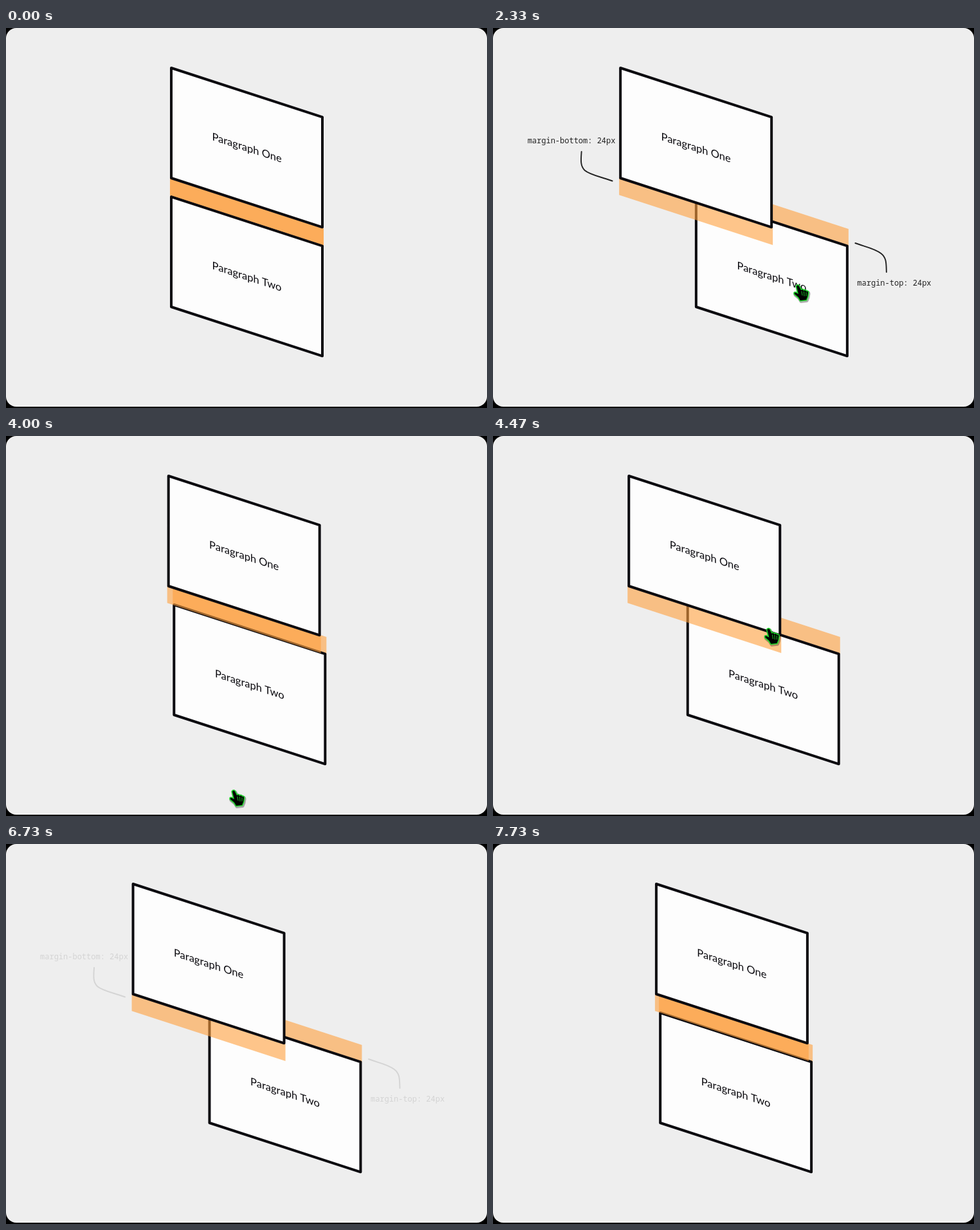
Animation, 748 px wide and 590 px high, one loop 7790 ms. Source, as an HTML page with a canvas:

```html
<!DOCTYPE html>
<html lang="en">
<head>
<meta charset="utf-8">
<title>Collapsing margins</title>
<style>
  html, body { margin: 0; width: 100%; height: 100%; overflow: hidden; background: #000; }
  canvas { display: block; width: 748px; height: 590px; }
</style>
</head>
<body>
<canvas id="stage" width="748" height="590"></canvas>
<script>
const ctx = document.getElementById('stage').getContext('2d');

const LOOP = 7790;
const STEP = 1000 / 15;
const SKEW = Math.tan(18 * Math.PI / 180);
const INK = '#0b0a0f';
const LABEL_INK = '#222';

// Overdamped spring: slow and fast decay rates per second
const SLOW = 3, FAST = 40;
const SPREAD = 60;
const targets = [[0.984, SPREAD], [3.0, 0], [3.98, SPREAD], [6.72, 0]];

// Labels: seconds at which each fade in and fade out begins
const labelFades = [[1.735, 2.875], [4.73, 6.595]];

// Pointer visits: [seconds, x, y]
const visits = [
  [[0.98, 440, 566], [1.13, 452, 485], [1.53, 474, 401], [2.65, 474, 401], [2.9, 462, 600]],
  [[3.96, 349, 575], [4.0, 354, 552], [4.13, 372, 480], [4.5, 434, 283], [6.5, 434, 283], [6.63, 430, 600]]
];

const clamp = v => Math.max(0, Math.min(1, v));

function springStep(x, v, goal, dt) {
  const y = x - goal;
  const b = -(v + SLOW * y) / (FAST - SLOW);
  const a = y - b;
  const es = a * Math.exp(-SLOW * dt), ef = b * Math.exp(-FAST * dt);
  return [goal + es + ef, -SLOW * es - FAST * ef];
}

function spreadAt(t) {
  let x = 0, v = 0;
  targets.forEach(([start, goal], i) => {
    if (t <= start) return;
    const end = i + 1 < targets.length ? targets[i + 1][0] : Infinity;
    [x, v] = springStep(x, v, goal, Math.min(t, end) - start);
  });
  return x;
}

function labelAlpha(t) {
  let alpha = 0;
  for (const [show, hide] of labelFades) {
    if (t < show) continue;
    alpha = t < hide ? clamp((t - show) / 0.25) : Math.exp(-15 * (t - hide));
  }
  return alpha;
}

function pointerAt(t) {
  for (const keys of visits) {
    for (let i = 1; i < keys.length; i++) {
      const [t0, x0, y0] = keys[i - 1], [t1, x1, y1] = keys[i];
      if (t >= t0 && t < t1) {
        const p = (t - t0) / (t1 - t0);
        return [x0 + (x1 - x0) * p, y0 + (y1 - y0) * p];
      }
    }
  }
  return null;
}

// Runs draw() in skewed space with its origin at (x, y)
function skewed(x, y, draw) {
  ctx.save();
  ctx.transform(1, SKEW, 0, 1, x, y);
  draw();
  ctx.restore();
}

function margin(x, top, bottom) {
  skewed(x - 2, 0, () => {
    ctx.fillStyle = 'rgba(255,161,63,0.6)';
    ctx.fillRect(0, top, 239, bottom - top);
  });
}

function paragraph(x, y, text) {
  const w = 235, h = 171;
  ctx.beginPath();
  ctx.moveTo(x, y);
  ctx.lineTo(x + w, y + w * SKEW);
  ctx.lineTo(x + w, y + w * SKEW + h);
  ctx.lineTo(x, y + h);
  ctx.closePath();
  ctx.fillStyle = '#fdfdfd';
  ctx.fill();
  ctx.lineWidth = 4;
  ctx.lineJoin = 'round';
  ctx.strokeStyle = INK;
  ctx.stroke();
  skewed(x, y, () => {
    ctx.fillStyle = INK;
    ctx.font = '16.5px Lato, sans-serif';
    ctx.textAlign = 'center';
    ctx.fillText(text, w / 2, h / 2 + 5.8);
  });
}

function label(dx, text, x, y, curve) {
  ctx.save();
  ctx.translate(dx, 0);
  ctx.fillStyle = ctx.strokeStyle = LABEL_INK;
  ctx.font = '12px "Noto Sans Mono", monospace';
  ctx.textAlign = 'left';
  ctx.fillText(text, x, y);
  ctx.lineWidth = 1.9;
  ctx.lineCap = 'round';
  ctx.stroke(new Path2D(curve));
  ctx.restore();
}

const hand = new Path2D('M-2 0Q0-3 2 0L5 6Q8 4 9 7Q12 5 13 8Q16 7 16 10L15 16L13 21L4 22L1 17L-5 12Q-6 9-3 10L1 12Z');
const fingers = new Path2D('M6 8L7 14M9.5 8.5L10 15M13 9.5L13 15');

function pointer(x, y) {
  ctx.save();
  ctx.translate(x, y);
  ctx.lineJoin = ctx.lineCap = 'round';
  ctx.save();
  ctx.translate(1, 1.5);
  ctx.strokeStyle = 'rgba(0,0,0,0.3)';
  ctx.lineWidth = 5;
  ctx.stroke(hand);
  ctx.restore();
  ctx.strokeStyle = '#1fd52b';
  ctx.lineWidth = 3.2;
  ctx.stroke(hand);
  ctx.fillStyle = '#000';
  ctx.fill(hand);
  ctx.lineWidth = 0.9;
  ctx.stroke(fingers);
  ctx.restore();
}

function render(t) {
  ctx.fillStyle = '#000';
  ctx.fillRect(0, 0, 748, 590);
  ctx.fillStyle = '#eee';
  ctx.beginPath();
  ctx.roundRect(0, 0, 748, 588, 16);
  ctx.fill();

  const d = spreadAt(t);
  const left = 257 - d, right = 257 + d;
  margin(right, 234.3, 261);
  paragraph(right, 262, 'Paragraph Two');
  margin(left, 233, 259.3);
  paragraph(left, 62, 'Paragraph One');

  ctx.globalAlpha = labelAlpha(t);
  label(-d, 'margin-bottom: 24px', 112.5, 179,
    'M196.5 192C195.5 205 194.5 214 201.5 221C209.5 228 223.5 230 244.5 237.5');
  label(d, 'margin-top: 24px', 507.5, 400,
    'M504.5 334C517.5 339 534.5 342 544.5 350C553.5 357 552.5 366 553 379');
  ctx.globalAlpha = 1;

  const at = pointerAt(t);
  if (at) pointer(...at);
}

const begin = performance.now();

function frame() {
  // The picture advances fifteen times a second
  const ms = (performance.now() - begin) % LOOP;
  render(Math.floor((ms + 4) / STEP) * STEP / 1000);
  requestAnimationFrame(frame);
}
frame();
</script>
</body>
</html>
```
